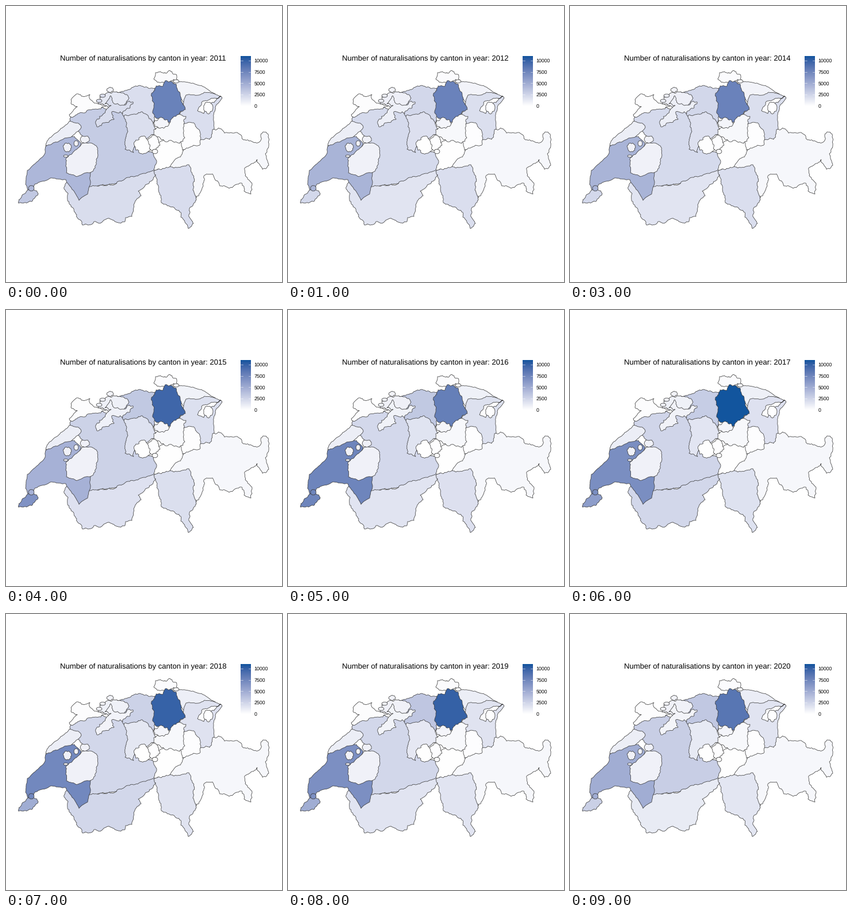
A matplotlib script for the animation above (10000 ms loop, 480 by 480 pixels).

```python
import numpy as np
import matplotlib.pyplot as plt
from matplotlib.animation import FuncAnimation
from matplotlib.patches import Polygon

SIZE, DPI = 480, 80
PX = 72 / DPI
TOP = 11000
FONT = "Liberation Sans"
LINE = "#3a3a3a"

plt.rcParams["text.hinting"] = "none"
fig = plt.figure(figsize=(SIZE / DPI, SIZE / DPI), dpi=DPI, facecolor="white")
ax = fig.add_axes([0, 0, 1, 1])
ax.axis("off")

# --- colour scale: white to deep blue, blended in Lab space ---
M = np.array([[0.4124, 0.3576, 0.1805],
              [0.2126, 0.7152, 0.0722],
              [0.0193, 0.1192, 0.9505]])
WHITE = M.sum(axis=1)


def to_lab(rgb):
    c = np.asarray(rgb, float)
    lin = np.where(c > 0.04045, ((c + 0.055) / 1.055) ** 2.4, c / 12.92)
    f = np.cbrt(M @ lin / WHITE)
    return np.array([116 * f[1] - 16, 500 * (f[0] - f[1]), 200 * (f[1] - f[2])])


LOW = to_lab([1, 1, 1])
HIGH = to_lab(np.array([14, 84, 158]) / 255)


def shade(value):
    lab = LOW + (HIGH - LOW) * min(max(value / TOP, 0), 1)
    fy = (lab[0] + 16) / 116
    f = np.array([fy + lab[1] / 500, fy, fy - lab[2] / 200])
    xyz = np.where(f > 0.2069, f ** 3, (f - 16 / 116) / 7.787) * WHITE
    lin = np.clip(np.linalg.solve(M, xyz), 0, 1)
    rgb = np.where(lin > 0.0031308, 1.055 * lin ** (1 / 2.4) - 0.055, 12.92 * lin)
    return np.clip(rgb, 0, 1)


# --- map: a few corners per canton, fractal borders between them ---
# Later cantons cover earlier ones, so each shared border is drawn once.
regions = []
rng = np.random.default_rng(26)


def jag(a, b, wild):
    """Points from a up to b, bent by repeated midpoint shifts."""
    d = b - a
    length = np.hypot(*d)
    if length < 3.2:
        return [a]
    normal = np.array([-d[1], d[0]]) / length
    shift = np.clip(rng.normal(), -1.5, 1.5) * wild * min(length, 11)
    mid = (a + b) / 2 + normal * shift
    return jag(a, mid, wild) + jag(mid, b, wild)


def region(key, *corners, wild=0.13):
    pts = np.array(corners, float)
    edge = [p for a, b in zip(pts, np.roll(pts, -1, axis=0)) for p in jag(a, b, wild)]
    patch = Polygon(edge, closed=True, ec=LINE, lw=0.75 * PX, joinstyle="round",
                    zorder=2 + len(regions) * 0.01)
    ax.add_patch(patch)
    regions.append((key, patch))


def blob(key, x, y, rx, ry):
    a = np.linspace(0, 2 * np.pi, 10, endpoint=False)
    region(key, *zip(x + rx * np.cos(a), y + ry * np.sin(a)), wild=0.2)


region("BE", (114, 203), (112, 190), (140, 178), (168, 176), (200, 183), (212, 194),
       (213, 222), (210, 240), (238, 250), (264, 256), (266, 275), (258, 290),
       (204, 306), (142, 320), (144, 286), (150, 255), (136, 231), (125, 217))
region("VS", (107, 304), (101, 318), (108, 326), (107, 338), (113, 349), (123, 363),
       (133, 381), (143, 381), (153, 375), (162, 378), (179, 369), (192, 376),
       (207, 375), (208, 368), (219, 366), (222, 346), (235, 330), (230, 322),
       (248, 309), (258, 297), (266, 286), (258, 284), (240, 291), (204, 303),
       (176, 312), (146, 314), (130, 318))
region("VD", (34, 310), (35, 297), (37, 286), (47, 277), (60, 265), (68, 256),
       (69, 244), (90, 230), (119, 227), (131, 240), (120, 262), (112, 280),
       (120, 288), (147, 290), (147, 305), (142, 327), (127, 338), (115, 319),
       (104, 302), (78, 299), (50, 310), (46, 321), (38, 320), wild=0.06)
region("GE", (22, 343), (27, 332), (38, 320), (49, 320), (56, 326), (45, 340), (32, 342))
blob("VD", 44, 317, 5, 5)
region("NE", (69, 243), (71, 236), (90, 219), (111, 200), (126, 204), (131, 211),
       (113, 228), (96, 233), wild=0.07)
region("JU", (110, 189), (118, 180), (124, 175), (114, 171), (113, 163), (119, 156),
       (126, 153), (138, 157), (146, 154), (147, 163), (157, 169), (174, 174),
       (165, 179), (142, 181), (126, 187), (113, 193))
region("FR", (131, 240), (146, 238), (158, 245), (159, 264), (148, 289), (125, 296),
       (105, 290), (104, 266), (119, 252))
blob("FR", 137, 232, 8, 6)
blob("FR", 107, 246, 7, 8)
blob("FR", 122, 239, 4, 5)
blob("FR", 104, 261, 4, 2)
region("AG", (191, 150), (207, 147), (232, 138), (258, 143), (264, 185), (255, 204),
       (212, 196), (202, 188), (206, 165))
region("BL", (163, 158), (174, 152), (192, 149), (203, 151), (214, 160), (205, 173),
       (190, 176), (160, 170))
blob("BS", 181, 146, 6, 4)
region("SO", (157, 199), (170, 187), (183, 173), (172, 170), (182, 156), (188, 170),
       (199, 173), (221, 167), (203, 187), (184, 184), (188, 197), (172, 203),
       (158, 210), wild=0.18)
blob("SO", 168, 156, 5, 3)
blob("SO", 162, 165, 5, 3)
region("LU", (206, 190), (224, 188), (237, 184), (254, 200), (264, 222), (240, 231),
       (226, 242), (222, 255), (207, 249), (210, 222))
region("TG", (283, 138), (299, 131), (325, 134), (345, 141), (364, 153), (350, 162),
       (314, 172), (296, 155), wild=0.06)
region("SG", (309, 166), (313, 155), (335, 155), (345, 150), (368, 155), (376, 160),
       (364, 176), (361, 195), (361, 216), (359, 236), (338, 241), (318, 230),
       (302, 204), (298, 192), (306, 182), wild=0.08)
region("GR", (278, 277), (300, 250), (341, 232), (354, 232), (359, 215), (370, 212),
       (380, 221), (402, 220), (414, 233), (440, 237), (447, 219), (456, 223),
       (457, 242), (451, 257), (457, 277), (446, 284), (437, 267), (416, 281),
       (416, 295), (428, 311), (426, 327), (414, 322), (410, 308), (388, 317),
       (372, 313), (359, 292), (344, 296), (343, 312), (330, 338), (318, 310),
       (314, 288))
region("TI", (257, 288), (272, 279), (297, 281), (318, 276), (326, 295), (325, 320),
       (331, 337), (319, 352), (318, 366), (326, 378), (317, 387), (304, 367),
       (304, 359), (270, 342), (265, 318), (262, 300))
region("UR", (256, 258), (262, 238), (280, 230), (305, 234), (312, 247), (282, 281),
       (258, 286), (262, 272))
region("GL", (308, 206), (326, 203), (337, 218), (338, 240), (307, 251), (303, 228))
region("ZH", (253, 152), (261, 139), (272, 140), (278, 128), (296, 136), (303, 155),
       (312, 180), (299, 189), (284, 202), (260, 194), (255, 186), (257, 168))
region("SZ", (257, 215), (281, 207), (286, 199), (299, 189), (313, 192), (309, 206),
       (311, 229), (302, 239), (277, 236), (260, 227))
blob("OW", 238, 242, 15, 15)
blob("NW", 257, 238, 9, 14)
blob("OW", 259, 253, 5, 4)
blob("ZG", 270, 204, 14, 9)
region("SH", (257, 127), (260, 116), (285, 112), (297, 122), (297, 131), (275, 133),
       (262, 131), wild=0.2)
blob("SH", 296, 131, 5, 3)
region("AR", (333, 182), (340, 168), (355, 162), (374, 157), (362, 168), (346, 172),
       (344, 187))
blob("AI", 352, 177, 8, 10)

# --- counts per step: 2011, 2012-14, then each year from 2015 to 2020 ---
STEPS = np.linspace(0, 1, 8)


def trend(first, last, power=1):
    return first + (last - first) * STEPS ** power


counts = dict(
    ZH=[7800, 7750, 9700, 8000, 10950, 10000, 10050, 8600],
    VD=[4350, 4550, 4700, 7600, 7000, 7400, 6900, 4950],
    GE=[3300, 2300, 6700, 7600, 6000, 5000, 5000, 2800],
    BE=[3050, 2200, 2700, 2300, 2500, 2400, 2400, 2900],
    AG=[1950, 2350, 3250, 3250, 3000, 2700, 3400, 3300],
    VS=[2000, 1600, 1750, 1600, 2400, 2400, 1600, 1200],
    LU=trend(1900, 1250), TI=trend(2050, 1500), SG=trend(1950, 1600),
    TG=trend(650, 1050), SO=trend(2000, 650, 0.12), BL=trend(1350, 800, 0.12),
)
steady = dict(NE=1000, FR=800, BS=700, ZG=580, GR=480, SZ=420, SH=220, JU=170,
              GL=130, AR=150, NW=90, UR=60, OW=60, AI=30)
counts.update({key: trend(v, v) for key, v in steady.items()})

# --- legend ---
LEFT, RIGHT, UPPER, LOWER = 408.2, 425.4, 87.2, 173.8
ramp = np.array([[shade(v)] for v in np.linspace(TOP, 0, 120)])
ax.imshow(ramp, extent=(LEFT, RIGHT, LOWER, UPPER), aspect="auto",
          interpolation="bilinear", zorder=1)
ax.set_xlim(0, SIZE)
ax.set_ylim(SIZE, 0)
for v in range(0, 10001, 2500):
    y = LOWER - v / TOP * (LOWER - UPPER)
    for x in (LEFT, RIGHT - 3.4):
        ax.plot([x, x + 3.4], [y, y], color="white", lw=0.5 * PX, zorder=3)
    ax.text(431.5, y + 3.2, str(v), fontsize=8.8 * PX, family=FONT, va="baseline")

title = ax.text(94.1, 95.2, "", fontsize=13.16 * PX, family=FONT, va="baseline")


def draw(i):
    step = max(i - 2, min(i, 1))
    for key, patch in regions:
        patch.set_facecolor(shade(counts[key][step]))
    title.set_text(f"Number of naturalisations by canton in year: {2011 + i}")
    return [patch for _, patch in regions] + [title]


anim = FuncAnimation(fig, draw, frames=10, interval=1000, repeat=True, repeat_delay=0)
plt.show()
```
